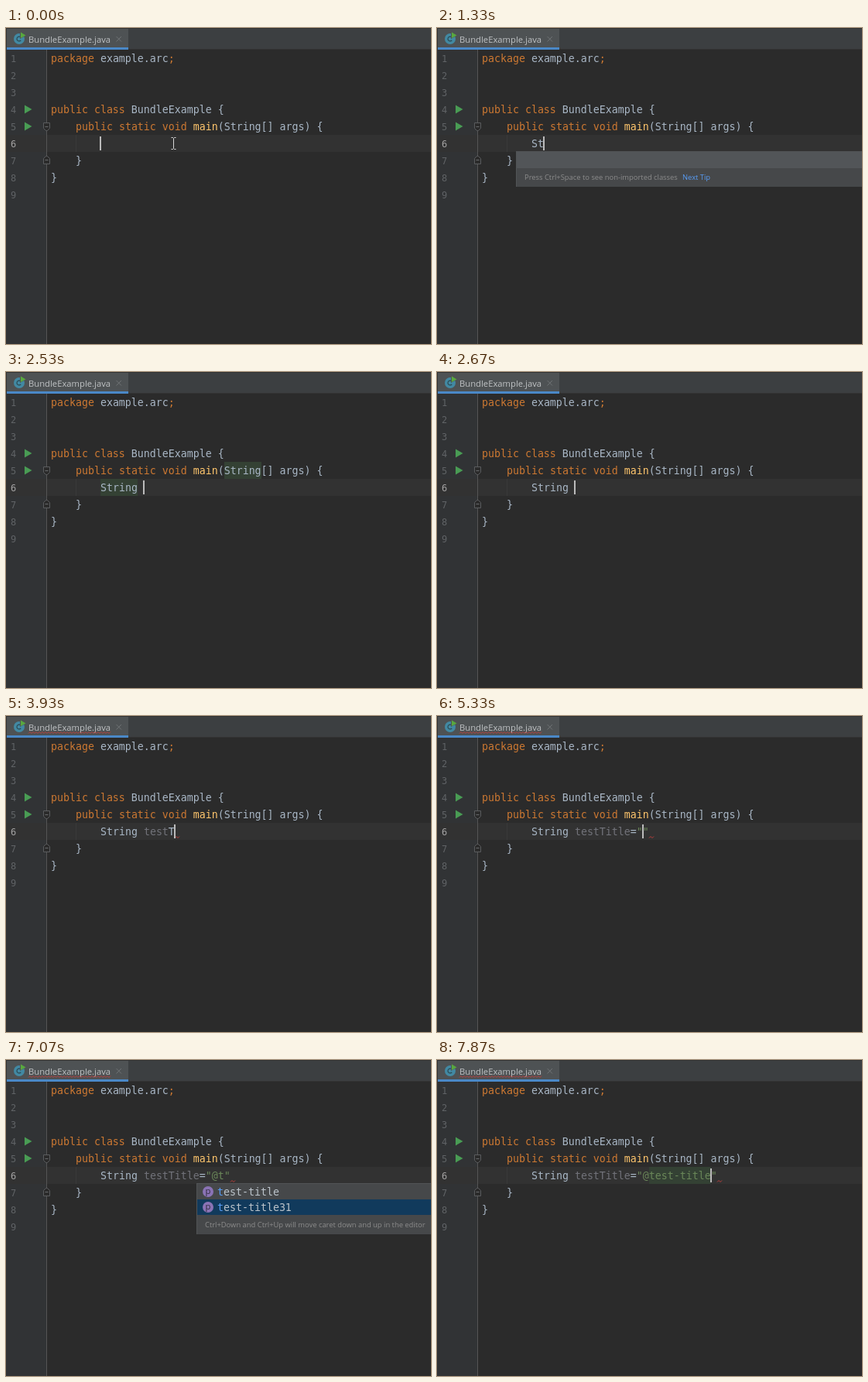
Recreate the animation shown at these times as an HTML page. Size 549 by 408 pixels, loop 8 s.

```html
<!DOCTYPE html>
<html lang="en">
<head>
<meta charset="utf-8">
<title>Code completion</title>
<style>
  html, body { margin: 0; width: 100%; height: 100%; overflow: hidden; background: #2b2b2b; }
  svg { display: block; width: 549px; height: 408px; }
  text { white-space: pre; font-family: "DejaVu Sans Mono", monospace; font-size: 13.288px; }
  .num { font-size: 12px; }
  .ui { font-family: "Open Sans", sans-serif; font-size: 11.25px; }
  .hint { font-family: "Open Sans", sans-serif; font-size: 9.4px; }
</style>
</head>
<body>
<svg id="stage" viewBox="0 0 549 408">
  <g id="frame"></g>
  <g id="marks"></g>
  <g id="code"></g>
  <g id="live"></g>
</svg>
<script>
const LOOP = 8000, CELL = 8, LEFT = 58, ROW = 22, TOP = 28;
const C = {
  text: '#a9b7c6', key: '#cc7832', method: '#ffc66d', str: '#6a8759', unused: '#72737a',
  match: '#589df6', item: '#bcc4cb', dim: '#8e8a85', popup: '#46484a', pick: '#525558',
  focus: '#113a5c', usage: '#344134', error: '#bc3f3c', edge: '#515456'
};
const $ = id => document.getElementById(id);
const colX = col => LEFT + col * CELL;
const rowY = line => TOP + (line - 1) * ROW;
const between = (t, a, b) => t >= a && t < b;

const rect = (x, y, w, h, fill) => `<rect x="${x}" y="${y}" width="${w}" height="${h}" fill="${fill}"/>`;
const path = (d, fill, stroke = 'none', width = 1) =>
  `<path d="${d}" fill="${fill}" stroke="${stroke}" stroke-width="${width}"/>`;
const label = (x, y, s, fill, cls = '') => `<text class="${cls}" x="${x}" y="${y}" fill="${fill}">${s}</text>`;
const spans = (x, y, parts) => `<text x="${x}" y="${y}">` +
  parts.map(([s, fill]) => `<tspan fill="${fill}">${s}</tspan>`).join('') + '</text>';
const line = (n, col, parts) => spans(colX(col), rowY(n) + 16, parts);

function wave(x, y, width) {
  let d = `M${x} ${y}`;
  for (let i = 2; i <= width; i += 2) d += `L${x + i} ${y - (i % 4)}`;
  return path(d, 'none', C.error);
}

function classIcon(x, y) {
  return `<circle cx="${x}" cy="${y}" r="7" fill="#4289a3"/>` +
    path(`M${x + 2.2} ${y - 1.8}A2.9 2.9 0 1 0 ${x + 2.2} ${y + 1.8}`, 'none', '#2b4852', 1.2);
}

function foldMark(y, dir) {
  const tip = y + 5 * dir, flat = y - 5 * dir, bend = y + 2 * dir;
  return path(`M48.5 ${flat}H56.5V${bend}L53.5 ${tip}H51.5L48.5 ${bend}Z`, '#2b2b2b', '#5a5c5e') +
    path(`M50.5 ${y}H54.5`, 'none', '#66696b');
}

function drawFrame() {
  let s = rect(0, 0, 549, 28, '#3c3f41') + rect(0, 0, 158, 25, '#4e5254') +
    rect(0, 0, 549, 1, '#323232') + rect(0, 27, 549, 1, '#323232') + rect(0, 25, 158, 3, '#4a88c7') +
    rect(0, 0, 1, 28, '#323232');
  s += classIcon(17, 14) + path('M18 6L25 10L18 14Z', '#4e5254') + path('M19 5.5L25.5 9.5L19 13Z', '#59a83f');
  s += label(29, 19, 'BundleExample.java', '#c0c3c5', 'ui');
  s += path('M142.5 11L149 17.5M149 11L142.5 17.5', 'none', '#6e7274');
  s += rect(0, 28, 53, 380, '#313335') + rect(0, 138, 549, 22, '#323232') + rect(52, 28, 1, 380, '#555555');
  s += rect(90, 138, 1, 22, '#393939');
  for (let n = 1; n <= 9; n++) s += label(6, rowY(n) + 16, n, n === 6 ? '#a4a3a3' : '#606366', 'num');
  for (const n of [4, 5]) s += path(`M24 ${rowY(n) + 5.5}L33.5 ${rowY(n) + 11}L24 ${rowY(n) + 16.5}Z`, '#499c54');
  return s + foldMark(127.5, 1) + foldMark(170.5, -1);
}

function drawCode() {
  return line(1, 0, [['package ', C.key], ['example.arc', C.text], [';', C.key]]) +
    line(4, 0, [['public class ', C.key], ['BundleExample {', C.text]]) +
    line(5, 4, [['public static void ', C.key], ['main', C.method], ['(String[] args) {', C.text]]) +
    line(7, 4, [['}', C.text]]) + line(8, 0, [['}', C.text]]);
}

const TYPED = 'String testTitle="@t';
const KEYS = [1000, 1130, 1400, 1470, 1530, 1600, 2530, 3000, 3070, 3330, 3470,
  3930, 4070, 4200, 4270, 4400, 5000, 5330, 5870, 6200];
const NAME = 7, VALUE = 17, FAULT = 3800, CHOSEN = 7870;

function typedLine(t) {
  const text = t >= CHOSEN ? TYPED + 'est-title' : TYPED.slice(0, KEYS.filter(k => k <= t).length);
  const grey = t >= 4730 ? 16 : t >= FAULT ? 11 : NAME;
  const value = text.slice(VALUE);
  const parts = [[text.slice(0, NAME), C.text], [text.slice(NAME, grey), C.unused],
    [text.slice(grey, VALUE), C.text], [value && value + '"', C.str]];
  // The opening quote is the first character of the text after "=".
  const caret = 8 + text.length;
  return { parts, caret, end: caret + (value ? 1 : 0) };
}

const CLASSES = [
  ['String', '', 'java.lang', 'final'], ['STRING', '', 'javax.print.DocFlavor', 'static'],
  ['String', 'Builder', 'java.lang', 'final'], ['String', 'Buffer', 'java.lang', 'final'],
  ['String', 'IndexOutOfBoundsException', 'java.lang', ''],
  ['String', 'ConcatFactory', 'java.lang.invoke', 'final'], ['String', 'Joiner', 'java.util', 'final'],
  ['String', 'Tokenizer', 'java.util', ''], ['String', 'Reader', 'java.io', ''],
  ['String', 'Writer', 'java.io', ''], ['String', 'Content', 'javax.swing.text', 'final'],
  ['String', 'Monitor', 'javax.management.monitor', '']
];

function popup(x, bottom, body) {
  return `<svg x="0" y="0" width="549" height="${bottom}" style="height:${bottom}px">` +
    rect(x, 159, 549 - x, bottom - 159, C.edge) + rect(x + 1, 160, 548 - x, bottom - 160, C.popup) +
    body + '</svg>';
}

function tipPopup() {
  return popup(102, 205, rect(103, 160, 446, 21, C.pick) +
    label(113, 196, 'Press Ctrl+Space to see non-imported classes', '#8c8c8c', 'hint') +
    label(317, 196, 'Next Tip', C.match, 'hint'));
}

function classPopup(bottom) {
  const rows = CLASSES.map(([hit, rest, pack, kind], i) => {
    const y = 170 + i * 20;
    const badge = kind === 'final' ? path(`M102 ${y - 5}L105 ${y - 8}L107 ${y - 5}L104 ${y - 3}Z`, '#b0b4b7')
      : kind === 'static' ? path(`M101 ${y + 4}L104 ${y + 1}L107 ${y + 4}L104 ${y + 7}Z`, '#b0b4b7', C.popup) : '';
    return classIcon(109, y) + badge +
      spans(121, y + 5, [[hit, C.match], [rest + ' ', C.item], [pack, C.dim]]);
  });
  return popup(94, bottom, rect(95, 160, 454, 20, C.pick) + rows.join(''));
}

function titlePopup(picked, fill) {
  const rows = ['est-title', 'est-title31'].map((rest, i) => {
    const y = 170 + i * 20;
    return `<circle cx="261" cy="${y}" r="7" fill="#8a73b5"/>` +
      `<text class="ui" x="261" y="${y + 3}" text-anchor="middle" fill="#2f2a3a">p</text>` +
      spans(273, y + 5, [['t', C.match], [rest, C.item]]);
  });
  return popup(246, 225, rect(247, 160 + picked * 20, 302, 20, fill) + rows.join('') +
    label(257, 216, 'Ctrl+Down and Ctrl+Up will move caret down and up in the editor', '#8c8c8c', 'hint'));
}

function beam(x, y) {
  const d = `M${x - 3} ${y - 7.5}H${x - 1}L${x} ${y - 6.5}L${x + 1} ${y - 7.5}H${x + 3}` +
    `M${x} ${y - 6.5}V${y + 6.5}M${x - 3} ${y + 7.5}H${x - 1}L${x} ${y + 6.5}L${x + 1} ${y + 7.5}H${x + 3}`;
  return path(d, 'none', '#d8d8d8');
}

function marksAt(t) {
  if (between(t, 1730, 2670)) return rect(colX(28), 116, 48, 22, C.usage) + rect(colX(8), 138, 48, 22, C.usage);
  return t >= CHOSEN ? rect(colX(27), 138, 80, 22, C.usage) : '';
}

function liveAt(t) {
  const { parts, caret, end } = typedLine(t);
  let s = line(6, 8, parts);
  if (t >= FAULT) s += wave(29, 22.5, 106) + wave(colX(end), 157.5, 7);
  if (!between(t, 7070, 7530)) s += rect(colX(caret) - 1, 140, 2, 18, '#bbbbbb');
  if (t < 800) s += beam(216.5, 149);
  else if (t < 1000) s += beam(223.5, 144);
  if (between(t, 1330, 1870)) s += tipPopup();
  if (between(t, 1870, 2530)) s += classPopup(t < 2330 ? 265 : 408);
  if (between(t, 6270, CHOSEN)) {
    s += titlePopup(between(t, 7000, 7470) ? 1 : 0, t < 7000 ? C.pick : C.focus);
  }
  return s;
}

const shown = {};
function put(id, markup) {
  if (shown[id] !== markup) $(id).innerHTML = shown[id] = markup;
}

function render(t) {
  put('marks', marksAt(t));
  put('live', liveAt(t));
}

put('frame', drawFrame());
put('code', drawCode());
render(0);
const start = performance.now();
(function tick() {
  render((performance.now() - start) % LOOP);
  requestAnimationFrame(tick);
})();
</script>
</body>
</html>
```
